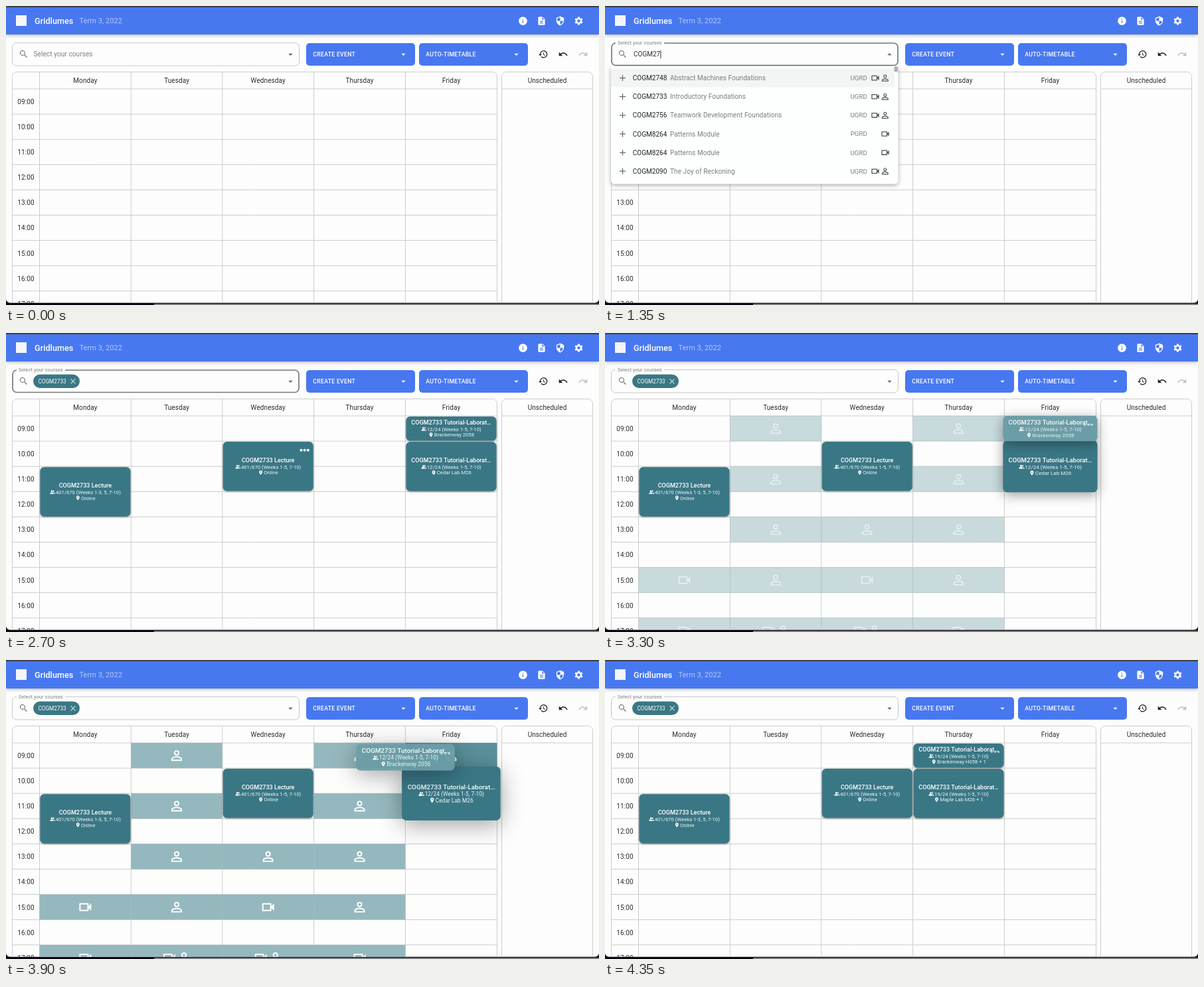
Write an HTML page with a canvas that moves like this. It is 893x451 px and loops after 4.5 s.

```html
<!DOCTYPE html>
<html lang="en">
<head>
<meta charset="utf-8">
<title>Timetable</title>
<style>
html, body { margin: 0; width: 100%; height: 100%; overflow: hidden; background: #fcfdfc; }
canvas { display: block; }
</style>
</head>
<body>
<canvas id="stage" width="893" height="451"></canvas>
<script>
const ctx = document.getElementById('stage').getContext('2d');
const LOOP = 4500, STEP = 150;
const BLUE = '#4878f0', TEAL = '#3a7785', LINE = '#cbcdcc', PAGE = '#fcfdfc', INK = '#2c2c2c';
const COLS = [50.5, 188.3, 325.8, 463.6, 601.4, 739.5];
const DAYS = ['Monday', 'Tuesday', 'Wednesday', 'Thursday', 'Friday'];
const ROW = 38.1, TOP = 125;

// Icons on a 24 unit grid
const ICONS = {
  search: 'M15.5 14h-.8l-.3-.3A6.5 6.5 0 1 0 13.7 14.4l.3.3v.8l5 5L20.5 19zM9.5 14a4.5 4.5 0 1 1 0-9 4.5 4.5 0 0 1 0 9z',
  info: 'M12 2a10 10 0 1 0 0 20 10 10 0 0 0 0-20zm1 15h-2v-6h2zm0-8h-2V7h2z',
  page: 'M14 2H6a2 2 0 0 0-2 2v16a2 2 0 0 0 2 2h12a2 2 0 0 0 2-2V8zm2 16H8v-2h8zm0-4H8v-2h8zm-3-5V3.5L18.5 9z',
  shield: 'M12 1L3 5v6c0 5.55 3.84 10.74 9 12 5.16-1.26 9-6.45 9-12V5zm0 11h7c-.53 4.12-3.28 7.79-7 8.94V12H5V6.3l7-3.1z',
  history: 'M13 3a9 9 0 0 0-9 9H1l4 4 4-4H6a7 7 0 1 1 2.06 4.94l-1.42 1.42A9 9 0 1 0 13 3zm-1 5v5l4.3 2.5.7-1.2-3.5-2.1V8z',
  undo: 'M12.5 8c-2.65 0-5.05 1-6.9 2.6L2 7v9h9l-3.6-3.6c1.4-1.2 3.1-1.9 5.1-1.9 3.5 0 6.5 2.3 7.6 5.5l2.4-.8C21.1 11 17.1 8 12.5 8z',
  video: 'M15 8v8H5V8zM16 6H4a1 1 0 0 0-1 1v10a1 1 0 0 0 1 1h12a1 1 0 0 0 1-1v-3.5l4 4v-11l-4 4V7a1 1 0 0 0-1-1z',
  person: 'M12 5.9a2.1 2.1 0 1 1 0 4.2 2.1 2.1 0 0 1 0-4.2zM12 14.9c3 0 6.1 1.5 6.1 2.1v1.1H5.9V17c0-.6 3.1-2.1 6.1-2.1zM12 4a4 4 0 1 0 0 8 4 4 0 0 0 0-8zm0 9c-2.7 0-8 1.3-8 4v3h16v-3c0-2.7-5.3-4-8-4z',
  people: 'M9 4a4 4 0 1 0 0 8 4 4 0 0 0 0-8zm0 9c-2.7 0-8 1.3-8 4v3h16v-3c0-2.7-5.3-4-8-4zM15 12a4 4 0 1 0-1.3-7.8 6 6 0 0 1 0 7.6zm1.7 1.1C18 14 19 15.3 19 17v3h4v-3c0-2.2-3.6-3.5-6.3-3.9z',
  place: 'M12 2a7 7 0 0 0-7 7c0 5.2 7 13 7 13s7-7.8 7-13a7 7 0 0 0-7-7zm0 9.5a2.5 2.5 0 0 1 0-5 2.5 2.5 0 0 1 0 5z',
  down: 'M7 10l5 5 5-5z',
  up: 'M7 14l5-5 5 5z',
  plus: 'M19 13h-6v6h-2v-6H5v-2h6V5h2v6h6z'
};
for (const k in ICONS) ICONS[k] = new Path2D(ICONS[k]);
ICONS.gear = gearPath();

function gearPath() {
  const p = new Path2D();
  for (let i = 0; i < 6; i++) {
    const a = i * Math.PI / 3 - Math.PI / 2;
    for (const [r, d] of [[7.2, -.36], [9.9, -.24], [9.9, .24], [7.2, .36]]) {
      p.lineTo(12 + r * Math.cos(a + d), 12 + r * Math.sin(a + d));
    }
  }
  p.closePath();
  p.moveTo(15.6, 12);
  p.arc(12, 12, 3.6, 0, Math.PI * 2);
  return p;
}

const course = (code, name, level, icons) => ({ code, name, level, icons });
const A = course('COGM4836', 'Geometry Sketches', 'UGRD', 'vp');
const B = course('COGM8264', 'Patterns Module', 'PGRD', 'v');
const C = course('COGM8264', 'Patterns Module', 'UGRD', 'v');
const D = course('COGM8306', 'Geometry Sketches', 'PGRD', 'vp');
const E = course('COGM2748', 'Abstract Machines Foundations', 'UGRD', 'vp');
const F = course('COGM4600', 'Practical Studio Seminar', 'UGRD', 'vp');
const G = course('COGM2733', 'Introductory Foundations', 'UGRD', 'vp');
const H = course('COGM2756', 'Teamwork Development Foundations', 'UGRD', 'vp');
const J = course('COGM2090', 'The Joy of Reckoning', 'UGRD', 'vp');
const PICK = G.code;

// Free slots: column, hour row, icons
const SLOTS = [
  [1, 0, 'p'], [1, 2, 'p'], [1, 4, 'p'], [1, 6, 'p'], [1, 8, 'vp'],
  [3, 0, 'p'], [3, 2, 'p'], [3, 4, 'p'], [3, 6, 'p'], [3, 8, 'v'],
  [2, 4, 'p'], [2, 6, 'v'], [2, 8, 'vp'], [0, 6, 'v'], [0, 8, 'v'], [4, 0, 'p']
];

const clamp = v => Math.max(0, Math.min(1, v));
const lerp = (a, b, p) => a + (b - a) * p;
const ease = p => p * p * (3 - 2 * p);
const midX = c => (COLS[c] + COLS[c + 1]) / 2;

function text(s, x, cy, size, color, { align = 'left', weight = 400, space = 0 } = {}) {
  ctx.font = `${weight} ${size}px Roboto, sans-serif`;
  ctx.letterSpacing = space + 'px';
  ctx.textAlign = align;
  ctx.fillStyle = color;
  ctx.fillText(s, x, cy + size * .36);
}

function icon(name, cx, cy, size, color, flip = 1) {
  ctx.save();
  ctx.translate(cx, cy);
  ctx.scale(flip * size / 24, size / 24);
  ctx.translate(-12, -12);
  ctx.fillStyle = color;
  ctx.fill(ICONS[name], 'evenodd');
  ctx.restore();
}

function box(x, y, w, h, r, fill, stroke, width = 1) {
  ctx.beginPath();
  ctx.roundRect(x, y, w, h, r);
  if (fill) { ctx.fillStyle = fill; ctx.fill(); }
  if (stroke) { ctx.strokeStyle = stroke; ctx.lineWidth = width; ctx.stroke(); }
}

function line(x1, y1, x2, y2, color = LINE, width = 1) {
  ctx.beginPath();
  ctx.moveTo(x1, y1);
  ctx.lineTo(x2, y2);
  ctx.strokeStyle = color;
  ctx.lineWidth = width;
  ctx.stroke();
}

function shadow(color, blur, dy) {
  ctx.shadowColor = color;
  ctx.shadowBlur = blur;
  ctx.shadowOffsetY = dy;
}

function header() {
  ctx.save();
  shadow('rgba(0,0,0,.28)', 5, 1.5);
  ctx.fillStyle = BLUE;
  ctx.fillRect(0, 0, 893, 43);
  ctx.restore();
  ctx.fillStyle = '#3b3d4a';
  ctx.fillRect(0, 0, 893, 2);
  ctx.fillStyle = '#f4f6fb';
  ctx.fillRect(15, 14, 16, 16);
  text('Gridlumes', 43, 22.5, 12.6, '#fff', { weight: 500, space: .07 });
  text('Term 3, 2022', 110.5, 22.5, 11, '#b4c8fa', { space: .06 });
  ['info', 'page', 'shield', 'gear'].forEach((n, i) => icon(n, 778.5 + 28 * i, 22.5, 15.2, '#fff'));
}

function button(label, x) {
  box(x, 56, 164, 34, 5, BLUE);
  text(label, x + 10.3, 73, 8.75, '#fff', { weight: 500, space: .25 });
  icon('down', x + 146.5, 73, 15.2, '#fff');
}

function grid() {
  box(9.5, 99.5, 730, 380, 7, null, LINE);
  box(746.5, 99.5, 137, 380, 7, null, LINE);
  line(746.5, 125, 883.5, 125);
  for (let r = 0; r < 9; r++) {
    const y = TOP + ROW * r;
    line(9.5, y, 739.5, y);
    text((r < 1 ? '0' : '') + (9 + r) + ':00', 30, y + 19.3, 10, INK, { align: 'center', space: .09 });
  }
  COLS.slice(0, 5).forEach(x => line(x, 99.5, x, 451));
  DAYS.forEach((d, i) => text(d, midX(i), 112.5, 10, INK, { align: 'center', space: .09 }));
  text('Unscheduled', 815, 112.5, 10, INK, { align: 'center', space: .09 });
}

function field(t) {
  const focused = t >= 300 && t < 3300, open = t >= 450 && t < 1950, chosen = t >= 1950;
  const up = clamp((t - 150) / 300);
  if (focused) box(10, 56, 431, 33.5, 6, null, '#747a78', 1.7);
  else box(9.5, 55.5, 432, 34.5, 6, null, '#c6c8c7');
  if (up > 0) {
    ctx.fillStyle = PAGE;
    ctx.fillRect(16, 53, 73 * up, 5);
  }
  text('Select your courses', lerp(41.5, 19, up), lerp(72.5, 55.3, up), lerp(10, 7.5, up),
    '#7c7e7d', { space: lerp(.1, .07, up) });
  icon('search', 26.5, 72.5, 15.2, '#777');
  icon(open ? 'up' : 'down', 428.5, 73, 15.2, '#666');
  if (chosen) {
    box(41, 62.5, 70, 20.5, 10.25, TEAL);
    text(PICK, 48.5, 73, 8.2, '#fff');
    line(97.5, 69.3, 104.5, 76.3, '#c8dadd', 1.2);
    line(104.5, 69.3, 97.5, 76.3, '#c8dadd', 1.2);
  } else if (focused) {
    const typed = PICK.slice(0, Math.max(0, (t - 450) / STEP));
    text(typed, 43, 72.8, 10, INK);
    const x = 43.8 + ctx.measureText(typed).width;
    line(x, 67, x, 79, '#333');
  }
}

function popup(t) {
  if (t < 450 || t >= 1950) return;
  const list = t < 1200 ? [A, B, C, D, E, F] : t < 1500 ? [E, G, H, B, C, J] : [G, E, H, J, B, C];
  ctx.save();
  shadow('rgba(0,0,0,.32)', 6, 2);
  box(9, 91, 432.5, 177.5, [0, 0, 5, 5], '#fdfefe');
  ctx.restore();
  ctx.fillStyle = '#f3f4f4';
  ctx.fillRect(9, 94.5, 427, 28);
  box(435.3, 91, 6, 8.5, 3, '#b0b2b1');
  list.forEach((c, i) => {
    const y = 108.6 + 28.12 * i;
    icon('plus', 26.5, y, 15.2, '#666');
    text(c.code, 41.7, y, 10, '#222', { space: .04 });
    text(c.name, 98, y, 10, '#7b7d7c', { space: .09 });
    text(c.level, 395, y, 9.8, '#7b7d7c', { align: 'right' });
    if (c.icons === 'vp') {
      icon('video', 407, y, 15.2, '#555');
      icon('person', 421.8, y, 15.2, '#555');
    } else icon('video', 422, y, 15.2, '#555');
  });
}

function detail(name, label, y) {
  ctx.font = '400 7.7px Roboto, sans-serif';
  ctx.letterSpacing = '0px';
  const w = ctx.measureText(label).width + 8.8;
  icon(name, -w / 2 + 4.1, y, 8.3, '#fff');
  text(label, -w / 2 + 8.8, y, 7.7, '#eef5f6');
}

function card(x, y, h, kind, seats, place, { scale = 1, lift = 0, fill = TEAL, alpha = 1, dots = 0 } = {}) {
  ctx.save();
  ctx.translate(x, y);
  ctx.scale(scale, scale);
  ctx.globalAlpha = alpha;
  ctx.save();
  shadow(`rgba(0,0,0,${lerp(.4, .36, lift)})`, lerp(3, 34, lift), lerp(1, 7, lift));
  box(-68, -h / 2, 136, h, 6, fill);
  ctx.restore();
  text(`${PICK} ${kind}`, 0, -9.3, 9.05, '#fff', { align: 'center', weight: 500 });
  detail('people', seats, .6);
  detail('place', place, 9.4);
  if (dots) {
    ctx.globalAlpha = alpha * dots;
    ctx.fillStyle = '#fff';
    for (let i = -1; i < 2; i++) {
      ctx.beginPath();
      ctx.arc(55 + 5.2 * i, -h / 2 + 12.8, dots < 1 ? 1.6 : 2, 0, 7);
      ctx.fill();
    }
  }
  ctx.restore();
}

function slots(t) {
  if (t < 3300 || t >= 4350) return;
  const active = t < 4050 ? 4 : 3;
  ctx.save();
  ctx.globalAlpha = t < 3450 || t >= 4200 ? .5 : 1;
  for (const [c, r, icons] of SLOTS) {
    const x = midX(c), y = TOP + ROW * r;
    ctx.fillStyle = r === 0 && c === active ? '#5a919c' : '#95b8be';
    ctx.fillRect(COLS[c], y, COLS[c + 1] - COLS[c], ROW);
    const pair = icons === 'vp' ? 11 : 0;
    if (icons !== 'p') icon('video', x - pair, y + 19.2, 24, '#fff');
    if (icons !== 'v') icon('person', x + pair, y + 19.2, 24, '#fff');
  }
  ctx.restore();
}

function classes(t) {
  if (t < 2100) return;
  const alpha = t < 2250 ? .6 : 1;
  const hover = (from, to) => t >= from && t < to ? 1 : 0;
  const lecture = (c, y, weeks, dots) =>
    card(midX(c), y, 74.3, 'Lecture', `401/670 (Weeks ${weeks}, 7-10)`, 'Online', { alpha, dots });
  lecture(0, 239.5, '1-3, 5', hover(2400, 2550));
  lecture(2, 201.2, '1-5', hover(2550, 2850));

  const kind = 'Tutorial-Laborat…';
  const moved = t >= 4050;
  const seats = `${moved ? 19 : 12}/24 (Weeks 1-5, 7-10)`;
  const dragging = t >= 3300 && t < 4350;
  const lift = dragging ? (t < 3450 || t >= 4200 ? .5 : 1) : 0;
  const scale = 1 + .093 * lift;
  const fri = midX(4), thu = midX(3);

  const follow = ease(clamp((t - 3900) / 450));
  card(lerp(fri, thu, moved ? follow : 0), 201.3, 74.3, kind, seats,
    moved ? 'Maple Lab M26 + 1' : 'Cedar Lab M26', { scale, lift, alpha });

  const p = t < 3450 ? 0 : t < 3900 ? lerp(.029, .5, Math.pow((t - 3450) / 450, 1.4))
    : lerp(.5, 1, 1 - Math.pow(1 - clamp((t - 3900) / 450), 1.6));
  const dip = dragging ? 2.5 * Math.sin(Math.PI * clamp((t - 3450) / 900)) : 0;
  card(lerp(fri, thu, p), 144.2 + dip, 36.6, kind, seats,
    moved ? 'Brackenway H058 + 1' : 'Brackenway 2058', {
      scale, lift, alpha: dragging ? .94 : alpha,
      fill: dragging ? '#6c9fa9' : TEAL,
      dots: dragging || t >= 4350 ? .6 : hover(3000, 3300)
    });
}

function frame(t) {
  ctx.fillStyle = '#0c0610';
  ctx.fillRect(0, 0, 893, 451);
  ctx.fillStyle = '#77787a';
  ctx.fillRect(223, 449, 670, 2);
  ctx.save();
  ctx.beginPath();
  ctx.roundRect(0, 0, 893, 447.7, [0, 0, 6, 6]);
  ctx.clip();
  ctx.fillStyle = PAGE;
  ctx.fillRect(0, 0, 893, 451);
  header();
  button('CREATE EVENT', 452);
  button('AUTO-TIMETABLE', 622);
  icon('history', 809, 72.7, 15.2, '#222');
  icon('undo', 839, 72.7, 15.2, '#222');
  icon('undo', 869, 72.7, 15.2, '#c0c1c1', -1);
  grid();
  slots(t);
  classes(t);
  field(t);
  popup(t);
  ctx.restore();
}

const start = performance.now();
function tick() {
  const t = (performance.now() - start) % LOOP;
  frame(Math.floor(t / STEP) * STEP);
  requestAnimationFrame(tick);
}
tick();
</script>
</body>
</html>
```
